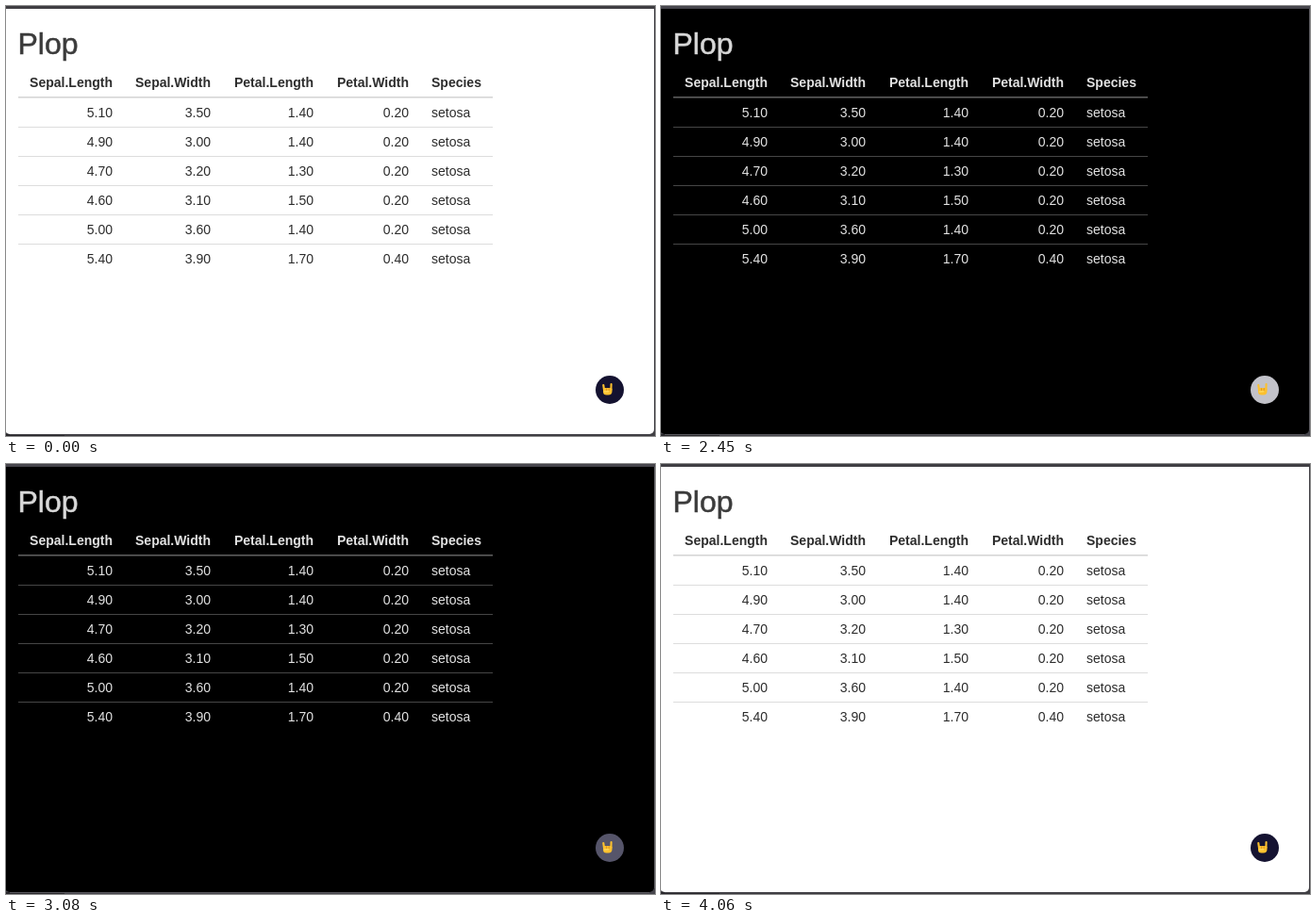
These frames come from a looping animation (688x456 px, 4.76 s). An HTML page with a canvas:

```html
<!DOCTYPE html>
<html lang="en">
<head>
<meta charset="utf-8">
<title>Dark mode toggle</title>
<style>
  html, body { margin: 0; width: 100%; height: 100%; overflow: hidden; background: #3b3a3f; }
  canvas { display: block; }
</style>
</head>
<body>
<canvas id="stage" width="688" height="456"></canvas>
<script>
const WIDTH = 688, HEIGHT = 456, LOOP = 4760, STEP = 70;
const LAYER_TIME = 300, BUTTON_TIME = 500;
const BUTTON = { x: 640, y: 407, radius: 15 };
const FONT = '"Liberation Sans", Arial, sans-serif';

// Each toggle becomes visible at `from`, with its transition begun at `start`.
const TOGGLES = [
  { from: 1610, start: 1513, dark: true },
  { from: 2380, start: 2358, dark: false },
  { from: 3010, start: 2983, dark: true },
  { from: 3640, start: 3606, dark: false },
];

const LIGHT = { frame: '#3f3e43', edge: '#3f3e43', page: '#fff', title: '#3b3b3b',
                text: '#2d2d2d', headLine: '#d6d6d6', rowLine: '#dddddd' };
const DARK = { frame: '#46454c', edge: '#5a595e', page: '#000', title: '#d8d8d8',
               text: '#e2e2e2', headLine: '#5c5c5c', rowLine: '#464646' };

const COLUMNS = [
  ['Sepal.Length', 113, ['5.10', '4.90', '4.70', '4.60', '5.00', '5.40']],
  ['Sepal.Width', 217, ['3.50', '3.00', '3.20', '3.10', '3.60', '3.90']],
  ['Petal.Length', 326, ['1.40', '1.40', '1.30', '1.50', '1.40', '1.70']],
  ['Petal.Width', 427, ['0.20', '0.20', '0.20', '0.20', '0.20', '0.40']],
  ['Species', 451, Array(6).fill('setosa')],
];

const ctx = document.getElementById('stage').getContext('2d');

// CSS "ease": cubic-bezier(.25, .1, .25, 1)
function ease(x) {
  if (x <= 0) return 0;
  if (x >= 1) return 1;
  const bezier = (s, a, b) => 3 * (1 - s) ** 2 * s * a + 3 * (1 - s) * s * s * b + s ** 3;
  let low = 0, high = 1;
  for (let i = 0; i < 30; i++) {
    const mid = (low + high) / 2;
    if (bezier(mid, .25, .25) < x) low = mid; else high = mid;
  }
  return bezier(low, .1, 1);
}

function paintPage(c, theme) {
  c.fillStyle = theme.frame;
  c.fillRect(0, 0, WIDTH, HEIGHT);
  c.fillStyle = '#29282c';
  c.fillRect(0, 454, 62, 2);
  c.beginPath();
  c.roundRect(-1, 3, 688, 451, [0, 0, 5, 5]);
  c.fillStyle = theme.page;
  c.fill();
  c.fillStyle = theme.edge;
  c.fillRect(687, 3, 1, 447);
  c.fillRect(4, 454, 678, 1);

  c.font = '32px ' + FONT;
  c.textAlign = 'left';
  c.fillStyle = c.strokeStyle = theme.title;
  c.lineWidth = .5;
  c.fillText('Plop', 12.5, 50.5);
  c.strokeText('Plop', 12.5, 50.5);

  c.fillStyle = theme.headLine;
  c.fillRect(13, 96, 503, 1.6);
  c.fillStyle = theme.rowLine;
  for (let row = 0; row < 5; row++) c.fillRect(13, 128 + row * 31, 503, 1);

  c.fillStyle = theme.text;
  for (const [name, x, values] of COLUMNS) {
    c.textAlign = name === 'Species' ? 'left' : 'right';
    c.font = 'bold 14px ' + FONT;
    c.fillText(name, x, 86);
    c.font = '14px ' + FONT;
    values.forEach((value, row) => c.fillText(value, x, 118 + row * 31));
  }
}

function makePage(theme) {
  const canvas = document.createElement('canvas');
  canvas.width = WIDTH;
  canvas.height = HEIGHT;
  if (theme) paintPage(canvas.getContext('2d'), theme);
  return canvas;
}

const lightPage = makePage(LIGHT), darkPage = makePage(DARK);
const masked = makePage();
const maskCtx = masked.getContext('2d');

// A small disc grows into a square; its magnified corners are soft, its sides sharp.
function paintDarkLayer(progress) {
  const scale = 1 + 99 * progress;
  const half = 14.5 * scale, flat = half * progress, blur = scale * .3;
  const outer = half + blur * 3;
  const { x, y } = BUTTON;
  const shape = new Path2D();
  shape.roundRect(x - half, y - half, 2 * half, 2 * half, half - flat);
  shape.rect(x - outer, y - flat, 2 * outer, 2 * flat);
  shape.rect(x - flat, y - outer, 2 * flat, 2 * outer);

  maskCtx.clearRect(0, 0, WIDTH, HEIGHT);
  maskCtx.filter = `blur(${blur}px)`;
  maskCtx.fill(shape);
  maskCtx.filter = 'none';
  maskCtx.globalCompositeOperation = 'source-in';
  maskCtx.drawImage(darkPage, 0, 0);
  maskCtx.globalCompositeOperation = 'source-over';

  ctx.save();
  ctx.beginPath();
  ctx.rect(x - half, y - half, 2 * half, 2 * half);
  ctx.clip();
  ctx.drawImage(masked, 0, 0);
  ctx.restore();
}

function line(color, width, ...points) {
  ctx.strokeStyle = color;
  ctx.lineWidth = width;
  ctx.beginPath();
  points.forEach(([x, y]) => ctx.lineTo(x, y));
  ctx.stroke();
}

function paintButton(whiteness) {
  const mix = [20, 18, 48].map(v => Math.round(v + (255 - v) * whiteness));
  ctx.fillStyle = `rgb(${mix})`;
  ctx.beginPath();
  ctx.arc(BUTTON.x, BUTTON.y, BUTTON.radius, 0, 7);
  ctx.fill();

  // Horns hand sign
  ctx.lineCap = ctx.lineJoin = 'round';
  ctx.fillStyle = '#fbc02f';
  ctx.beginPath();
  ctx.roundRect(633, 405, 9.5, 7.5, [1.5, 1.5, 4, 3.5]);
  ctx.fill();
  line('#fbc02f', 2.1, [634, 407], [633.3, 402]);
  line('#fbc02f', 2.1, [641.4, 407], [641.6, 401]);
  line('#d98a1c', .8, [636.6, 405.5], [636.6, 407.5]);
  line('#d98a1c', .8, [639.2, 405.5], [639.2, 407.5]);
  line('#ffd75a', 1.6, [634.5, 409], [638.5, 408.8]);
}

function paint(time) {
  const toggle = TOGGLES.findLast(t => time >= t.from);
  const progress = duration => {
    if (!toggle) return 0;
    const p = ease((time - toggle.start) / duration);
    return toggle.dark ? p : 1 - p;
  };
  const layer = progress(LAYER_TIME);
  ctx.drawImage(layer === 1 ? darkPage : lightPage, 0, 0);
  if (layer > 0 && layer < 1) paintDarkLayer(layer);
  paintButton(progress(BUTTON_TIME));
}

const begin = performance.now();
function tick() {
  const time = (performance.now() - begin) % LOOP;
  paint(Math.floor(time / STEP) * STEP);
  requestAnimationFrame(tick);
}
tick();
</script>
</body>
</html>
```
